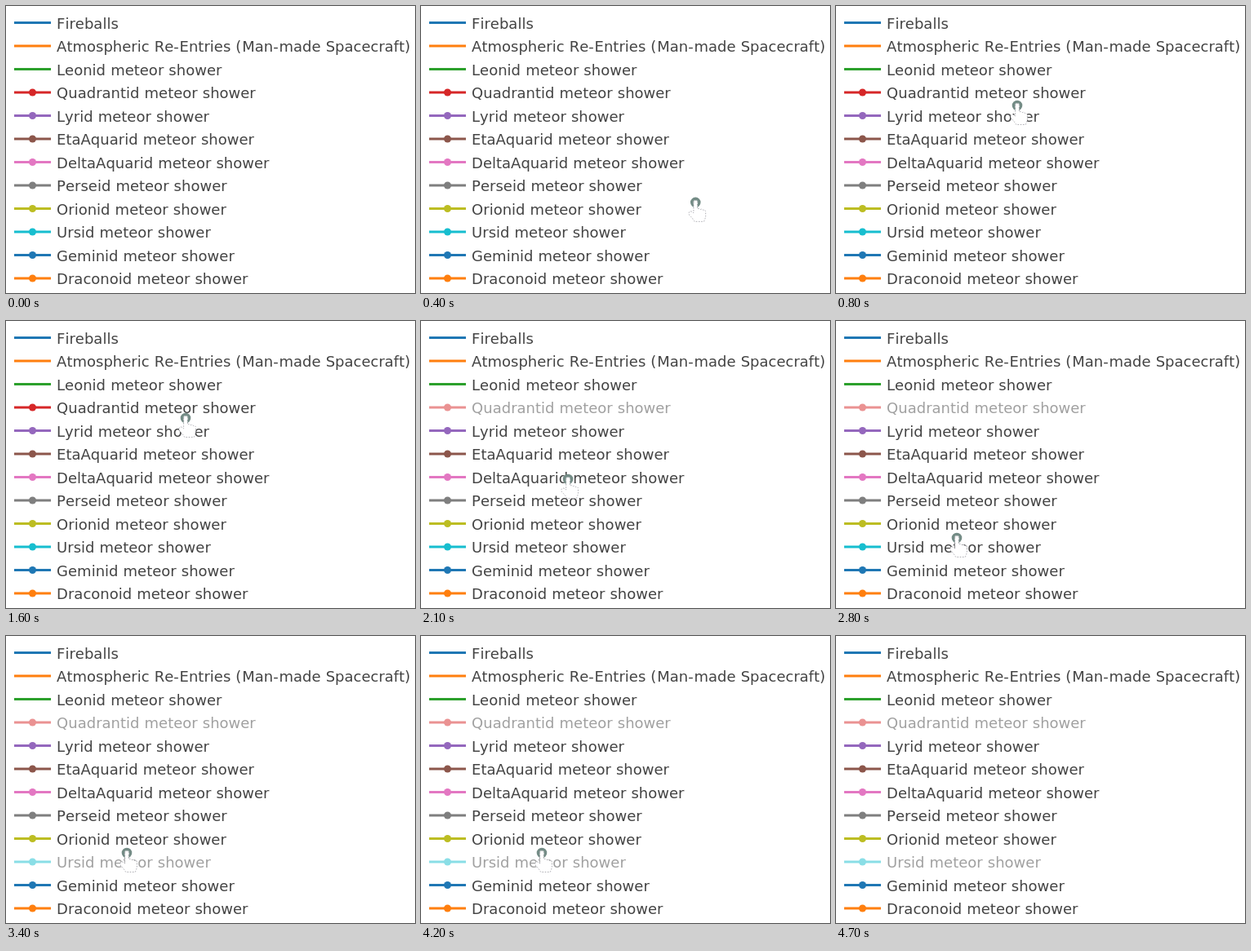
Write an HTML page that moves like this. It is 501x352 px and loops after 7.6 s.

```html
<!DOCTYPE html>
<html lang="en">
<head>
<meta charset="utf-8">
<title>Meteor shower legend</title>
<style>
  html, body { margin: 0; width: 100%; height: 100%; overflow: hidden; background: #fff; }
  svg { display: block; width: 501px; height: 352px; }
  text {
    font: 18px "DejaVu Sans", Verdana, sans-serif;
    font-kerning: none;
    word-spacing: .02em;
    fill: #444;
  }
  .wide { letter-spacing: .045em; }
</style>
</head>
<body>
<svg viewBox="0 0 501 352">
  <g id="legend"></g>
  <g id="hand">
    <circle r="4.6" fill="#dfe7e4" stroke="#748c86" stroke-width="3.4"/>
    <path d="M-2.4 0 Q-2.4 -2.4 0 -2.4 Q2.4 -2.4 2.4 0 V8 Q5 6.8 6.3 8.6
             Q8.6 7.5 9.6 9.6 Q12.4 9 12.4 12 V17 Q12 20 10.2 23.5 H-1.2
             Q-4 19 -7.6 15.5 Q-9 12 -6.6 11 Q-4.8 10.6 -2.4 13 Z"
          fill="#fff" stroke="#8c8c94" stroke-width=".7" stroke-dasharray="1.6 1.6"/>
  </g>
</svg>
<script>
const LOOP = 7600, STEP = 100;
const ROW = 28.5, TOP = 20.5;
const COLORS = ['#1f77b4', '#ff7f0e', '#2ca02c', '#d62728', '#9467bd',
                '#8c564b', '#e377c2', '#7f7f7f', '#bcbd22', '#17becf'];
const showers = ['Leonid', 'Quadrantid', 'Lyrid', 'EtaAquarid', 'DeltaAquarid',
                 'Perseid', 'Orionid', 'Ursid', 'Geminid', 'Draconoid'];
const labels = ['Fireballs', 'Atmospheric Re-Entries (Man-made Spacecraft)',
                ...showers.map(s => s + ' meteor shower')];

// When each clicked entry is switched off
const offAt = { Quadrantid: 1900, Ursid: 3400 };

// Pointer moves; bend pulls the path sideways
const outside = [316, 318];
const moves = [
  { from: 100, to: 800, end: [222, 122], bend: [120, 0] },
  { from: 800, to: 1500, end: [220, 119] },
  { from: 1900, to: 2350, end: [157, 299], bend: [-28, 0] },
  { from: 2500, to: 2800, end: [148, 266] },
  { from: 4200, to: 4700, end: outside }
];

const markup = s => s.replace(/[-()]/g, '<tspan class="wide">$&</tspan>');

const legend = document.getElementById('legend');
legend.innerHTML = labels.map((label, i) => {
  const y = TOP + ROW * i, color = COLORS[i % COLORS.length];
  const dot = i > 2 ? `<circle cx="32.5" cy="${y}" r="4.5" fill="${color}"/>` : '';
  return `<g><path d="M10 ${y}H55" stroke="${color}" stroke-width="3"/>${dot}` +
         `<text x="62.1" y="${y + 7}">${markup(label)}</text></g>`;
}).join('');

const hand = document.getElementById('hand');
const smooth = k => k * k * (3 - 2 * k);

function pointerAt(t) {
  let pos = outside;
  for (const { from, to, end, bend = [0, 0] } of moves) {
    if (t < from) break;
    const k = smooth(Math.min(1, (t - from) / (to - from)));
    pos = pos.map((p, j) => p + (end[j] - p) * k + 2 * k * (1 - k) * bend[j]);
  }
  return pos;
}

function draw(now) {
  const t = Math.floor((now % LOOP) / STEP) * STEP;
  hand.setAttribute('transform', `translate(${pointerAt(t)})`);
  hand.setAttribute('visibility', t > 100 && t < 4700 ? 'visible' : 'hidden');
  for (const name in offAt) {
    const row = legend.children[showers.indexOf(name) + 2];
    row.setAttribute('opacity', t >= offAt[name] ? .5 : 1);
  }
}

const start = performance.now();
function tick() {
  draw(performance.now() - start);
  requestAnimationFrame(tick);
}
tick();
</script>
</body>
</html>
```
